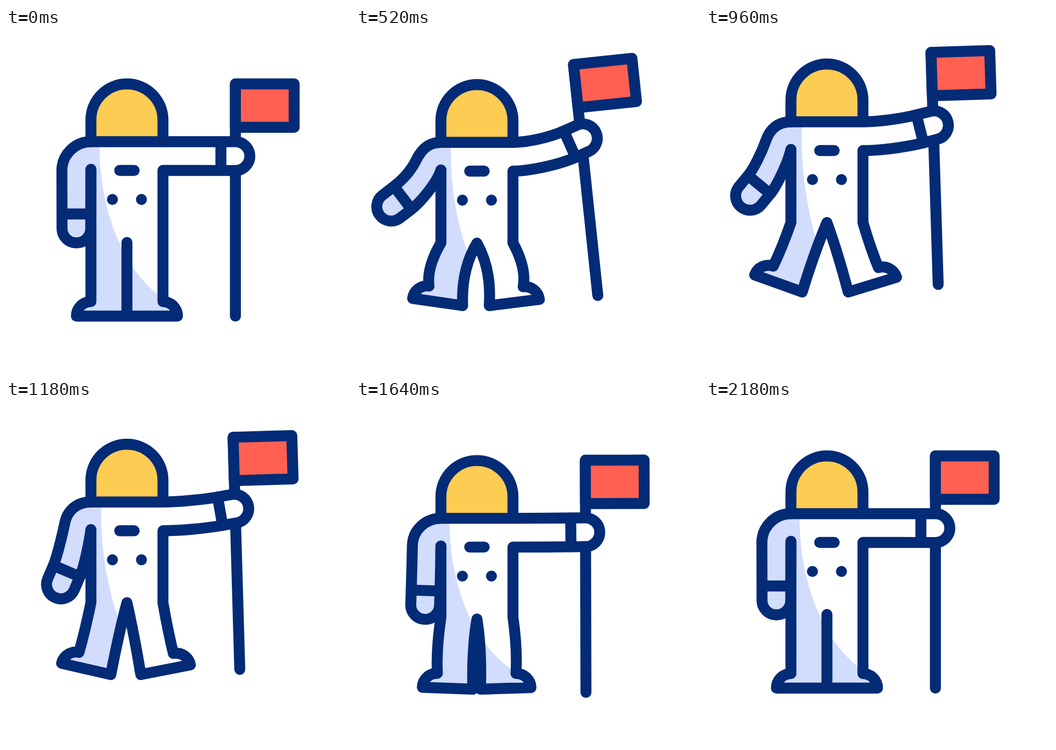
Animation of 640 by 640 pixels, one loop 2.4 s. Source, as an HTML page:

```html
<!DOCTYPE html>
<html lang="en">
<head>
<meta charset="utf-8">
<title>Astronaut with flag</title>
<style>
  html, body { margin: 0; width: 100%; height: 100%; overflow: hidden; background: #fff; }
  svg { display: block; width: 100vw; height: 100vh; }
  .ink { stroke: #032b76; stroke-width: 20.4; stroke-linecap: round; stroke-linejoin: round; fill: none; }
  .light { fill: #d2dcfd; }
  .white { fill: #fff; }
</style>
</head>
<body>
<svg viewBox="0 0 640 640">
  <defs><clipPath id="suit"><path id="suitClip"/></clipPath></defs>
  <g id="pole" class="ink">
    <path d="M426.7 104V536"/>
    <path d="M426.7 104H536V184.7H426.7Z" fill="#ff6051"/>
  </g>
  <path id="rightArm" class="ink white"/>
  <path id="rightCuff" class="ink"/>
  <path id="suitFill" class="white"/>
  <g clip-path="url(#suit)"><path id="shade" class="light"/></g>
  <path id="leftArm" class="ink light"/>
  <path id="leftCuff" class="ink"/>
  <path id="suitLine" class="ink"/>
  <g id="top" class="ink">
    <path d="M158 211.5V171A67 67 0 0 1 292 171V211.5Z" fill="#fdcc52"/>
    <path d="M211.5 265H238.5"/>
    <path d="M198 319h.01M252 319h.01"/>
  </g>
</svg>
<script>
const LOOP = 2400, END = 2180, STEP = 20;
const R = 26.8;      // half the width of a sleeve
const WRIST = 27;    // from cuff to centre of hand

// Smooth monotone curve through [time, value] keys, at rest and zero at both ends
function curve(...keys) {
  const k = [[0, 0], ...keys, [END, 0]];
  const d = k.slice(1).map(([x, y], i) => (y - k[i][1]) / (x - k[i][0]));
  const m = k.map((_, i) => {
    const a = d[i - 1], b = d[i];
    return a * b > 0 ? 2 * a * b / (a + b) : 0;
  });
  return t => {
    let i = 0;
    while (i < k.length - 2 && t > k[i + 1][0]) i++;
    const h = k[i + 1][0] - k[i][0];
    const u = (t - k[i][0]) / h, w = 1 - u;
    return k[i][1] * (1 + 2 * u) * w * w + m[i] * h * u * w * w +
      k[i + 1][1] * u * u * (3 - 2 * u) - m[i + 1] * h * u * u * w;
  };
}

// Crouch, jump, float down, sink into the landing, stand up
const body = curve([330, 26], [660, -24.5], [810, -42], [960, -37], [1420, -4], [1880, 16]);
const spread = curve([340, 11], [660, 39], [840, 47], [960, 46], [1420, 11], [1880, 5]);
const kneeBow = curve([340, 12], [660, 4], [960, 0], [1420, 0], [1880, 6]);
const leftSwing = curve([340, 43], [600, 54], [960, 39.5], [1420, 7.5], [1820, 0]);
const handLift = curve([340, 43.8], [660, 25.8], [960, 20.3], [1420, 7.3], [1720, 0]);
const poleTilt = curve([340, -11.5], [660, -2.1], [1420, -1.4], [1700, 0]);
const poleSlip = curve([340, 3.4], [660, 3.7], [1420, -3], [1700, 0]);

function pose(t) {
  const y = body(t), gap = spread(t), bow = kneeBow(t), lift = handLift(t);
  return {
    y, gap, bow,
    heelY: 536 + y - gap * gap * .0037 - bow * 2.25,   // bent or spread legs are shorter
    foot: gap * .43 - bow * .4,
    left: leftSwing(t),
    right: lift * .7,
    hand: [426.8 - lift * .13, 238.3 - lift + y],
    tilt: poleTilt(t),
    slip: poleSlip(t),
    shade: Math.max(0, Math.min(1, (gap - 11) / 25))
  };
}

const el = id => document.getElementById(id);
const draw = (id, d) => el(id).setAttribute("d", d);
const move = (id, value) => el(id).setAttribute("transform", value);
const mix = (a, b, k) => a + (b - a) * k;
const rad = deg => deg * Math.PI / 180;
const add = (p, v, k = 1) => [p[0] + v[0] * k, p[1] + v[1] * k];
const path = (...parts) => parts.map(p => Array.isArray(p) ? p.map(n => n.toFixed(2)).join(" ") : p).join(" ");

function drawLeftArm({ left, y }) {
  const a = rad(left), q = left / 53, bent = q ** .7;
  const dir = [-Math.sin(a), Math.cos(a)], side = [dir[1], -dir[0]];
  const hand = [131 - 66 * q, 373 - 42.5 * q * q + y];
  const cuff = add(hand, dir, -WRIST);
  const outer = add(cuff, side, -R), inner = add(cuff, side, R);
  const elbow = [mix(104, 113, bent), mix(265, 242.5, bent) + y];
  const pit = [158, 263 + y];
  draw("leftArm", path(
    "M", [158, 211.5 + y],
    "C", [128.5 + 8 * q, 211.5 + y], add(elbow, [10 * q, -29.5 + 10 * q]), elbow,
    "C", add(elbow, [-12 * q, 25]), add(outer, dir, -15), outer,
    "L", add(hand, side, -R), `A${R} ${R} 0 0 0`, add(hand, side, R),
    "L", inner, "C", add(inner, dir, -20), add(pit, [-8 * q, 25]), pit));
  draw("leftCuff", path("M", outer, "L", inner));
}

function drawRightArm({ right, hand, y }) {
  const a = rad(right);
  const dir = [Math.cos(a), -Math.sin(a)], side = [-dir[1], dir[0]];
  const cuff = add(hand, dir, -WRIST);
  const upper = add(cuff, side, -R), lower = add(cuff, side, R);
  draw("rightArm", path(
    "M", [292, 211.5 + y], "C", [319, 211.5 + y], add(upper, dir, -30), upper,
    "L", add(hand, side, -R), `A${R} ${R} 0 0 1`, add(hand, side, R),
    "L", lower, "C", add(lower, dir, -35), [322, 265 + y], [292, 265 + y]));
  draw("rightCuff", path("M", upper, "L", lower));
}

// Joints of one leg; s is -1 for left and 1 for right
function leg({ y, gap, bow, heelY, foot }, s) {
  const k = s < 0 ? 1 : .86, a = rad(foot * k);
  const c = Math.cos(a), n = Math.sin(a);
  const heel = [225 + s * gap * k, heelY];
  const place = (dx, dy) => add(heel, [s * (dx * c + dy * n), dy * c - dx * n]);
  const bend = (from, to) => [mix(from[0], to[0], .5) + s * 2 * bow, mix(from[1], to[1], .58)];
  const hip = [225 + s * 67, 399 + y * (y > 0 ? .55 : 1)];
  const crotch = [225, 399 + y];
  const ankle = place(67, -27), toe = place(94, 0);
  return { heel, hip, crotch, ankle, toe, knee: bend(hip, ankle), inside: bend(heel, crotch) };
}

function drawSuit(p) {
  const y = p.y, k = p.shade, l = leg(p, -1), r = leg(p, 1);
  const legs = path(
    "L", l.hip, "Q", l.knee, l.ankle, "A27 27 0 0 0", l.toe, "L", l.heel,
    "Q", l.inside, l.crotch, "Q", r.inside, r.heel,
    "L", r.toe, "A27 27 0 0 0", r.ankle, "Q", r.knee, r.hip);
  const fill = path("M", [158, 211.5 + y], legs, "L", [292, 211.5 + y], "Z");
  draw("suitClip", fill);
  draw("suitFill", fill);
  draw("suitLine", path("M", [158, 263 + y], legs, "L", [292, 265 + y]));

  // The shadow's edge slides off the right leg as the legs part
  const drop = Math.max(y, 0);
  const end = [mix(292, 235, k), mix(503 - drop, 520, k) + y];
  draw("shade", path(
    "M", [174 + 5 * k, 211 + y],
    "C", [172, 330 - drop * .4 + y], [mix(215, 205, k), 450 - drop * .8 + y], end,
    "L", add(end, [40, 20]), "V 600 H 60 V", [211 + y], "Z"));
}

function render(time) {
  const p = pose(Math.min(END, Math.floor(time / STEP) * STEP));
  const [hx, hy] = p.hand;
  move("pole", `translate(${hx - p.slip} ${hy - p.slip}) rotate(${p.tilt}) translate(-426.7 -238.3)`);
  move("top", `translate(0 ${p.y})`);
  drawRightArm(p);
  drawSuit(p);
  drawLeftArm(p);
}

const start = performance.now();
function tick() {
  render((performance.now() - start) % LOOP);
  requestAnimationFrame(tick);
}
tick();
</script>
</body>
</html>
```
